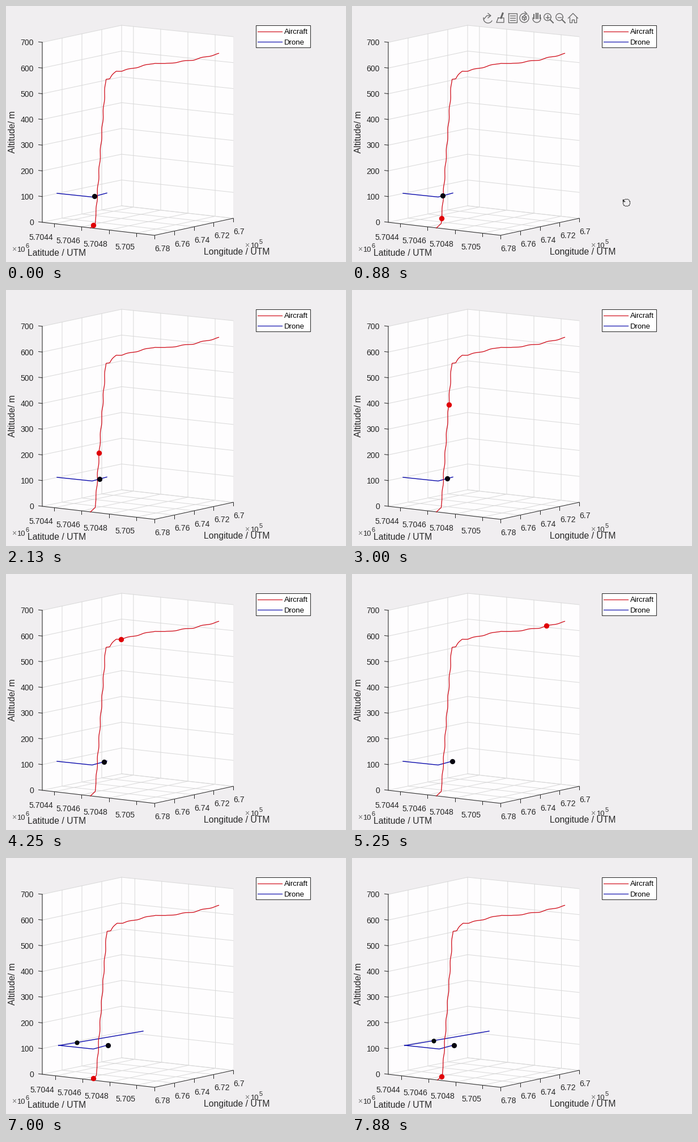
Animation of 600 by 451 pixels, one loop 8 s. Source, as a matplotlib script:

```python
import numpy as np
import matplotlib.pyplot as plt
from matplotlib.animation import FuncAnimation
from matplotlib.patches import Polygon, Rectangle

W, H, DPI = 600, 451, 100
PX = 72 / DPI
FRAMES, STEP = 64, 125
RESTART = 45  # second flight begins, latitude limits widen

RED, BLUE, INK, GRID = "#d00d1a", "#0c0cac", "#262626", "#d9d9d9"
plt.rcParams["font.family"] = "Liberation Sans"

fig = plt.figure(figsize=(W / DPI, H / DPI), dpi=DPI, facecolor="#f0eef0")
ax = fig.add_axes([0, 0, 1, 1])
ax.set_xlim(0, W)
ax.set_ylim(H, 0)
ax.axis("off")


def line(pts, color=INK, width=1.0, z=3):
    return ax.plot(*np.transpose(pts), color=color, lw=width * PX, zorder=z)[0]


def label(x, mid, s, size=14, color=INK, ha="center"):
    return ax.text(x, mid + 0.36 * size, s, size=size * PX, color=color,
                   ha=ha, va="baseline", zorder=6)


def dot(color, size):
    return ax.plot([], [], "o", color=color, ms=size * PX, mew=0, zorder=5)[0]


def mix(a, b, t):
    return np.add(a, t * np.subtract(b, a))


def arc(x, y, r, a=0, b=360, n=40):
    t = np.radians(np.linspace(a, b, n))
    return np.column_stack([x + r * np.cos(t), y + r * np.sin(t)])


# Projected corners of the plot box: left, back, right, front
LT, LB = (64, 64), (64, 381)
BT, BB = (204, 34), (204, 352)
RT, RB = (401, 54), (401, 374)
FB = (262, 404)
DOWN = (0, 6)

for face in ([LT, BT, BB, LB], [BT, RT, RB, BB], [LB, BB, RB, FB]):
    ax.add_patch(Polygon(face, fc="#fefdfe", ec="none", zorder=0))
line([LT, LB, FB, RB])

# Altitude
for i in range(8):
    t = i / 7
    p = mix(LB, LT, t)
    line([p, mix(BB, BT, t), mix(RB, RT, t)], GRID, z=1)
    line([p, p - (6.5, 0.8)])
    label(49, p[1] + 0.3, str(100 * i), ha="right")

# Longitude
for i in range(5):
    t = i / 4
    p = mix(FB, RB, t)
    line([mix(LT, BT, t), mix(LB, BB, t), p], GRID, z=1)
    line([p, p + DOWN])
    label(p[0] + 0.5, p[1] + 22.5, f"{6.78 - 0.02 * i:g}", ha="left")

# Latitude, moved when its limits widen
lat = [(line([FB, FB], GRID, z=1), line([FB, FB]),
        label(0, 0, f"{5.7044 + 0.0002 * i:g}", ha="right"))
       for i in range(4)]


def set_latitude(wide):
    for i, (grid, tick, text) in enumerate(lat):
        t = 0.106 + 0.244 * i
        t += 0.014 * (1 - t) * wide
        p = mix(LB, FB, t)
        grid.set_data(*np.transpose([p, mix(BB, RB, t), mix(BT, RT, t)]))
        tick.set_data(*np.transpose([p, p + DOWN]))
        text.set_position((p[0] - 2, p[1] + 29))


for x, y, power in ((14, 428, "6"), (425.5, 421, "5")):
    label(x, y, "×", 14, "#777777")
    label(x + 12.5, y, "10", 13)
    label(x + 24, y - 5.5, power, 11)
label(89.5, 434, "Latitude / UTM", 15.7)
label(407, 432.5, "Longitude / UTM", 15.7)
ax.text(11.8, 222, "Altitude/ m", size=15.7 * PX, color=INK, rotation=90,
        ha="center", va="center")

# Legend
ax.add_patch(Rectangle((441, 34), 96, 39, fc="white", ec=INK, lw=PX))
for y, c, s in ((44.5, RED, "Aircraft"), (63, BLUE, "Drone")):
    line([(444, y), (487, y)], c, 1.2)
    label(491, y, s, 13.2, "black", "left")

# Flight paths; progress along the climb is x - y, which always grows
turns = np.array([(149, 391), (157.5, 383), (176, 128.5), (183, 128),
                  (194, 114.5), (204, 114.5), (262, 100.5), (280, 102),
                  (330, 95), (376, 84)])
patrol = np.array([(90, 330), (152, 336.5), (178, 329.5)])
survey = np.array([(93, 330.5), (242, 305)])


def climb_at(d):
    x, y = (np.interp(d, turns[:, 0] - turns[:, 1], c) for c in turns.T)
    sway = 0.6 * np.sin(d / 6) * np.clip((d + 230) / 40, 0, 1)
    return np.array([x + sway, y + sway])


def widen(p):
    x, y = p
    return np.array([x + 2 * (376 - x) / 226, y])


climb = climb_at(np.arange(-242, 293))
climb_line = line(climb.T, RED, 1.3, 4)
patrol_line = line(patrol, BLUE, 1.4)
survey_line = line(survey, BLUE, 1.4)
drone = dot("#06040f", 9.2)
drone2 = dot("#040a0c", 8.2)
plane = dot("#e00006", 9.4)


def progress(n):
    if n >= RESTART:
        return -242 + 0.93 * max(0, n - 49)
    return np.interp(n, [0, 7, 11, 15, 30, 34, 44],
                     [-232, -216, -194, -150, 48, 88.5, 292])


# Hover toolbar
bar = []


def icon(pts, width=1.3):
    bar.append(line(pts, "#666666", width))


# export
icon(arc(240, 22, 8, 30, 190))
icon([(233, 23), (238, 17), (244, 17)])
icon([(240, 13), (245, 17), (240, 21)])
# brush
icon([(266, 13), (263, 21)], 3)
icon([(258, 21), (268, 21), (268, 29), (255, 29), (258, 21)])
# data tip
icon([(276, 13), (291, 13), (291, 29), (276, 29), (276, 13)])
for y in (17, 21, 25):
    icon([(279, y), (288, y)])
# rotate
icon(arc(304, 21, 8, -40, 285))
icon([(305, 10), (309, 14), (304, 16)])
icon(arc(304, 21, 4, 30, 390, 7))
for a in (90, 210, 330):
    icon([(304, 21), arc(304, 21, 4, a, a, 1)[0]])
# pan
icon(arc(326, 22, 7, -10, 190))
for i in range(4):
    x, top = 321 + 3.5 * i, 13 + (i - 1.4) ** 2
    icon([(x, 22), (x, top)], 2)
# zoom in, zoom out
for x in (345, 366):
    icon(arc(x, 19.5, 6.2))
    icon([(x + 4.6, 24), (x + 10, 29.5)], 2)
    icon([(x - 3.2, 19.5), (x + 3.2, 19.5)])
icon([(345, 16.3), (345, 22.7)])
# home
icon([(381.5, 21.5), (390, 13), (398.5, 21.5)])
for side in (-1, 1):
    icon([(390 + side * x, y) for x, y in
          ((6, 20), (6, 29), (2, 29), (2, 23.5), (0, 23.5))])

# Busy pointer
ring = ax.plot([], [], "o", color="#111111", ms=1.5 * PX, mew=0, zorder=7)[0]
tip = ax.plot([], [], color="#111111", lw=1.3 * PX, zorder=7)[0]


def set_pointer(n):
    x, y = np.add((484, 346), max(0, n - 7) * np.array([44.5, 24]))
    ring.set_data(*arc(x, y, 6.3, 0, 345, 20).T)
    tip.set_data([x - 6, x - 6, x - 3], [y - 5.5, y - 2.5, y - 2.5])
    for part in (ring, tip):
        part.set_visible(6 <= n <= 9)


def draw(n):
    late = n >= RESTART
    fit = widen if late else np.asarray
    set_latitude(late)
    climb_line.set_data(*fit(climb))
    patrol_line.set_data(*fit(patrol.T))
    plane.set_data(*fit(climb_at(progress(n))).reshape(2, 1))

    x = 156 + 0.5 * min(n, 44)
    drone.set_data(*fit((x, np.interp(x, *patrol.T))).reshape(2, 1))
    x = 106 + 2.714 * (n - 49)
    drone2.set_data([x], [np.interp(x, *survey.T)])

    for part in (survey_line, drone2):
        part.set_visible(late)
    for part in bar:
        part.set_visible(5 <= n <= 10)
    set_pointer(n)
    return []


anim = FuncAnimation(fig, draw, frames=FRAMES, interval=STEP,
                     repeat=True, repeat_delay=0, blit=False)
plt.show()
```
